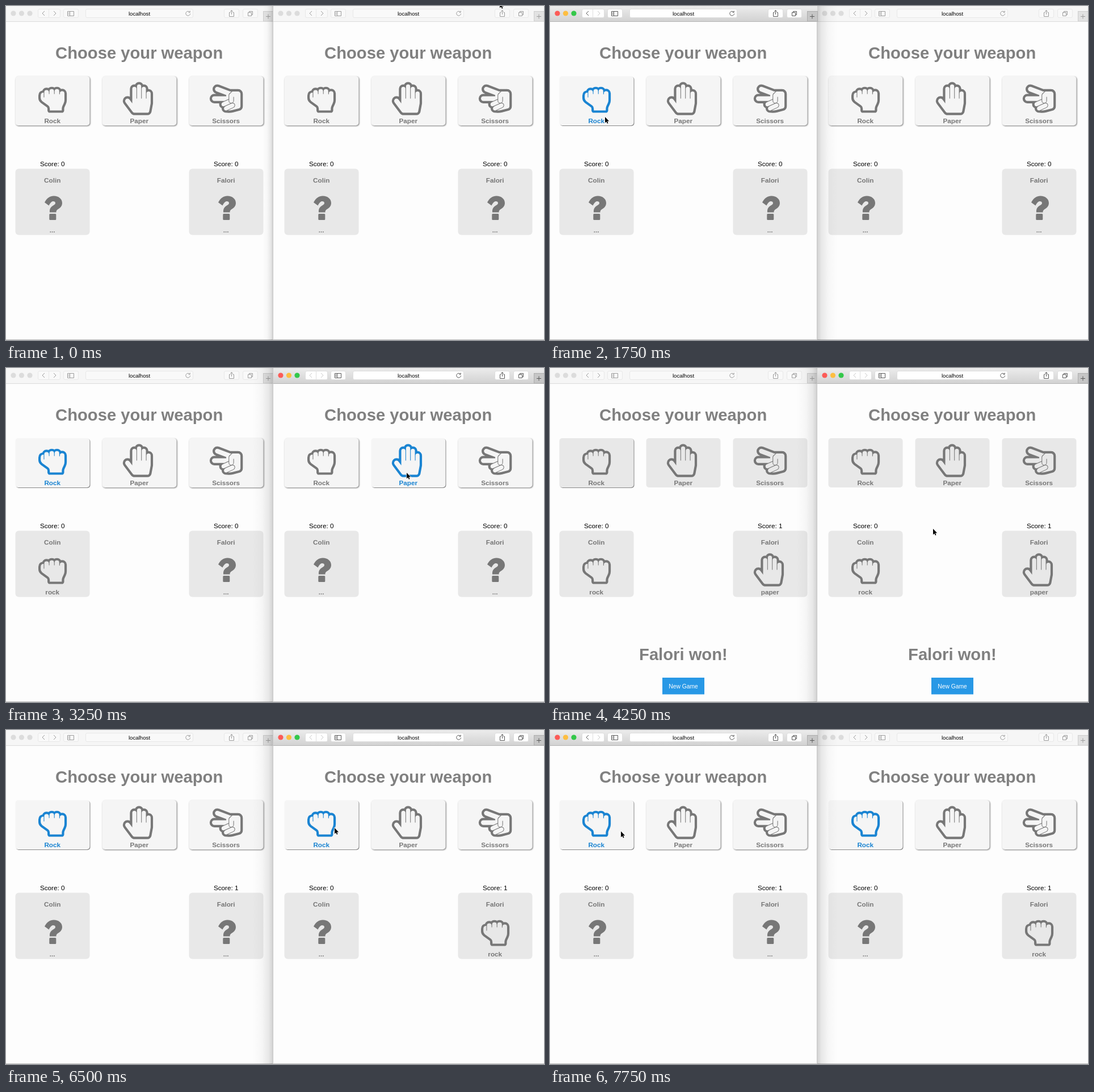
Write an HTML page that moves like this. It is 948x590 px and loops after 8 s.

```html
<!DOCTYPE html>
<html lang="en">
<head>
<meta charset="utf-8">
<title>Choose your weapon</title>
<style>
  html, body { margin: 0; width: 100%; height: 100%; overflow: hidden; background: #fdfdfd; }
  svg { display: block; }
  text { font-family: "Liberation Sans", Arial, sans-serif; text-anchor: middle; font-size: 11.7px; }
  .h { font-size: 29.2px; font-weight: bold; fill: #808080; }
  .b { font-weight: bold; fill: #777; }
  .icon { color: #777; --face: #e8e8e8; }
  .card .icon { --face: #f5f5f5; }
  .card rect { fill: #f5f5f5; filter: drop-shadow(1.7px 1.7px .8px #777); }
  .card.hover rect { filter: drop-shadow(1px 1px .5px #888); }
  .card.hover .icon { color: #1a84d2; }
  .card.hover text { fill: #1a84d2; }
  .over .card rect { fill: #e8e8e8; filter: none; }
  .over .card.hover rect { filter: drop-shadow(1px 1px .5px #888); }
  .over .card .icon { color: #777; --face: #e8e8e8; }
  .over .card text { fill: #777; }
  .bar { fill: #f6f6f6; }
  .rim { stroke: #dcdcdc; }
  .btn { fill: #f9f9f9; stroke: #e8e8e8; }
  .ink { fill: none; stroke: #9c9c9c; }
  .tab { fill: #e2e2e2; stroke: #cdcdcd; }
  .light { fill: #dcdcdc; }
  .active .bar { fill: url(#chrome); }
  .active .rim { stroke: #b4b4b4; }
  .active .btn { fill: #fff; stroke: #dedede; }
  .active .ink { stroke: #585858; }
  .active .off { stroke: #cacaca; }
  .active .tab { fill: #c6c6c6; stroke: #adadad; }
  .active .l0 { fill: #fc5b57; }
  .active .l1 { fill: #fdbe41; }
  .active .l2 { fill: #34c84a; }
</style>
</head>
<body>
<svg id="stage" width="948" height="590" viewBox="0 0 948 590">
  <defs>
    <linearGradient id="chrome" x2="0" y2="1">
      <stop stop-color="#ececec"/><stop offset="1" stop-color="#d2d2d2"/>
    </linearGradient>
    <linearGradient id="shade">
      <stop stop-opacity="0"/><stop offset=".45" stop-opacity=".025"/>
      <stop offset=".8" stop-opacity=".085"/><stop offset="1" stop-opacity=".17"/>
    </linearGradient>
    <!-- Hands: the pale inside is filled over a wide outline. -->
    <g fill="var(--face)" stroke="currentColor" stroke-width="256" stroke-linejoin="round" paint-order="stroke">
      <path d=""/>
    </g>
    <g id="unknown" fill="currentColor" transform="translate(-16 -317)">
      <path d="M68 347C72 339 78 335.5 84 335.5C93 335.5 99 341 99 348C99 354 95 357 91.5 359C89 360.5 88.5 362 88.5 364.5H77C76.5 358 79 355 83 352.5C86 350.5 87 349.8 87 348C87 346 85.5 345 83 345C80.5 345 78.5 347 75.5 352.5Z"/>
      <rect x="76.3" y="367" width="12" height="11" rx="1.5"/>
    </g>
  </defs>
</svg>
<script>
const LOOP = 8000;
const PLAYERS = ['Colin', 'Falori'];
const WEAPONS = ['Rock', 'Paper', 'Scissors'];
const stage = document.getElementById('stage');

// Insides of the hands, in units of 1/1792 of the icon size.
const FIST = 'M128 736q0-160 160-160v256h32v-276a124 124 0 0 1 248 0v90h32v-138a124 124 0 0 1 248 0v138h32v-138a124 124 0 0 1 248 0v160h32v-50a124 124 0 0 1 248 0v350q0 90-40 180l-70 150q-32 70-32 150v88h-646v-86q0-120-80-180l-330-240q-82-60-82-170z';
const PALM = 'M880 128a112 112 0 0 0-112 112v656h-32v-528a112 112 0 0 0-224 0v784l-154-205q-38-51-102-51a128 128 0 0 0-128 128q0 43 26 77l384 512q38 51 102 51h688q34 0 61-22t34-56l76-405q5-32 5-59v-498a112 112 0 0 0-224 0v272h-32v-528a112 112 0 0 0-224 0v528h-32v-656a112 112 0 0 0-112-112z';
const RING = 'M1024 825l-155 71-163 74q-66 32-66 102a112 112 0 0 0 112 112q26 0 46-10l338-154q-112-28-112-140z';
const PINKY = 'M1344 1136a112 112 0 0 0-112-112q-26 0-46 10l-290 132q-121 55-121 127a113 114 0 0 0 113 114q20 0 38-9l352-160q66-32 66-102z';
const BLADES = 'M1112 384l-650-248q-24-8-46-8a128 128 0 0 0-128 128q0 84 82 120l526 200v64h-640a128 128 0 0 0 0 256h535l233-106v-198q0-63 46-106l111-102z';
const THUMB = 'M1073 1408q82 0 155-19l339-85q97-28 97-124v-668a128 128 0 0 0-128-128h-308l-136 126q-36 33-36 82v296a112 108 0 0 0 112 108a112 116 0 0 0 112-116v-208h32v208q0 70-57 114q121 20 121 142q0 88-84 131l-310 141z';

// Each list holds [start in ms, value...]; a value stays until the next start.
const cursorSteps = [
  [0, 870, -7], [500, 538, 82], [750, 280, 227], [1000, 279, 231], [1250, 173, 239],
  [1500, 98, 208], [1750, 97, 196], [3000, 600, 190], [3250, 706, 185], [4250, 675, 284],
  [4500, 642, 519], [4750, 708, 552], [5000, 690, 558], [6000, 698, 212],
  [6250, 580, 169], [6500, 579, 173], [7250, 457, 173], [7500, 134, 180], [7750, 125, 179]
];
const frontSteps = [[0, 1], [1000, 0], [2500, 1], [7000, 0]];
const activeSteps = [[0, -1], [1000, 0], [2750, 1], [7000, 0]];
const hoverSteps = [
  [[0, -1], [1500, 0]],
  [[0, -1], [3000, 0], [3250, 1], [4250, -1], [6250, 0]]
];
const pickSteps = [
  [[0, '', ''], [2250, 'rock', ''], [3500, 'rock', 'paper'], [5250, '', '']],
  [[0, '', ''], [3500, 'rock', 'paper'], [5250, '', ''], [6500, '', 'rock']]
];

function at(steps, t) {
  let cur = steps[0];
  for (const s of steps) if (s[0] <= t) cur = s;
  return cur.slice(1);
}

function el(parent, tag, attrs = {}, text) {
  const n = document.createElementNS('http://www.w3.org/2000/svg', tag);
  for (const k in attrs) n.setAttribute(k, attrs[k]);
  if (text !== undefined) n.textContent = text;
  parent.appendChild(n);
  return n;
}

const shift = (parent, x, y = 0) => el(parent, 'g', { transform: `translate(${x} ${y})` });
const box = (p, cls, x, y, width, height, rx = 0) => el(p, 'rect', { class: cls, x, y, width, height, rx });
const ink = (p, d, cls = '') => el(p, 'path', { class: 'ink ' + cls, d });
const label = (p, cls, x, y, text) => el(p, 'text', { class: cls, x, y }, text);

function hand(id, x, y, d) {
  el(stage.querySelector('defs'), 'path', {
    id, d, transform: `translate(${x} ${y}) scale(${58.5 / 1792})`,
    fill: 'var(--face)', stroke: 'currentColor', 'stroke-width': 256,
    'stroke-linejoin': 'round', 'paint-order': 'stroke'
  });
}
stage.querySelector('defs > g:not([id])').remove();
hand('rock', 41, 10.3, FIST);
hand('paper', 36.8, 10.3, PALM);
hand('scissors', 36.8, 14.5, RING + PINKY + BLADES + THUMB);

function toolbar(g, i) {
  const near = shift(g, i * 471), far = shift(g, i * 477);
  [13, 27.5, 42].forEach((cx, k) => el(near, 'circle', { class: 'light l' + k, cx, cy: 13, r: 4.6 }));
  box(near, 'btn', 56.5, 5.5, 39, 15, 2.5);
  ink(near, 'M68 9L64 13L68 17', i ? 'off' : '');
  ink(near, 'M84 9L88 13L84 17', 'off');
  el(near, 'path', { class: 'btn', d: 'M75.5 6V20' });
  box(near, 'btn', 101.5, 5.5, 26, 15, 2.5);
  ink(near, 'M108.5 9.5H119.5V17.5H108.5ZM112.5 9.5V17.5M109.5 12H111.5M109.5 14.5H111.5');
  box(near, 'btn', 140.5, 5.5, 189 + i * 6, 15, 2.5);
  el(g, 'text', { x: 235 + i * 474, y: 17, style: 'font-size:9.7px' }, 'localhost');
  ink(far, 'M323.6 10.6A3.9 3.9 0 1 0 324.6 13.5M324.2 8.5V11.2H321.4');
  box(far, 'btn', 384.5, 5.5, 26, 15, 2.5);
  ink(far, 'M395.5 11.5H393.5V18.5H401.5V11.5H399.5M397.5 15V8M395 10L397.5 7.5L400 10');
  box(far, 'btn', 417.5, 5.5, 26, 15, 2.5);
  ink(far, 'M428.5 11V9.5H434.5V15.5H433M426.5 11.5H432.5V17.5H426.5Z');
  box(far, 'tab', 453.5, 9.5, 18, 17.5);
  ink(far, 'M462 14.5V22.5M458 18.5H466');
}

function makeWindow(i) {
  const g = el(stage, 'g');
  const shade = el(g, 'rect', { y: 0, height: 590, fill: 'url(#shade)' });
  const x0 = i ? 470 : 0, w = i ? 478 : 471;
  el(g, 'rect', { x: x0, y: 0, width: w, height: 590, fill: '#fdfdfd' });
  box(g, 'bar', x0, 0, w, 27);
  toolbar(g, i);
  el(g, 'path', { class: 'rim', d: `M${x0} 27.5H${x0 + w}` });
  el(g, 'path', { stroke: '#b8b8b8', d: `M${x0} 589.5H${x0 + w}` });
  el(g, 'path', { stroke: '#c6c6c6', d: i ? 'M470.5 0V590' : 'M470.5 28V590' });

  const page = shift(g, i * 474);
  label(page, 'h', 234.7, 92.5, 'Choose your weapon');
  const cards = WEAPONS.map((name, k) => {
    const c = el(shift(page, 16 + k * 153, 124), 'g');
    box(c, '', .5, 0, 131, 87, 5);
    el(c, 'use', { href: '#' + name.toLowerCase(), class: 'icon' });
    label(c, 'b', 65.7, 83, name);
    return c;
  });
  const slots = PLAYERS.map((name, k) => {
    const c = shift(page, 16 + k * 306, 287);
    const score = label(c, '', 65.7, -4, '');
    el(c, 'rect', { x: .5, y: .5, width: 131, height: 117, rx: 6, fill: '#e8e8e8' });
    label(c, 'b', 65.7, 25, name);
    const icon = el(c, 'use', { y: 30, class: 'icon' });
    return { score, icon, pick: label(c, 'b', 65.7, 113, '') };
  });
  const result = el(page, 'g');
  label(result, 'h', 234.9, 516, PLAYERS[1] + ' won!');
  const button = el(result, 'rect', { x: 198, y: 547, width: 74, height: 29.5 });
  el(result, 'text', { x: 235, y: 565.5, fill: '#fff', style: 'font-size:10.3px' }, 'New Game');
  return { g, shade, page, cards, slots, result, button };
}

const windows = [makeWindow(0), makeWindow(1)];
const cursor = el(stage, 'path', {
  d: 'M0 0V10.6L2.4 8.2L3.9 11.8L5.5 11.1L4 7.6H7.2Z',
  fill: '#000', stroke: '#fff', 'stroke-width': 1.2, 'paint-order': 'stroke'
});
let front = -1;

function drawWindow(win, i, t, active) {
  const over = t >= 3500 && t < 5250;
  const [hover] = at(hoverSteps[i], t);
  const picks = at(pickSteps[i], t);
  win.g.setAttribute('class', active === i ? 'active' : '');
  win.page.setAttribute('class', over ? 'over' : '');
  win.cards.forEach((c, k) => c.setAttribute('class', k === hover ? 'card hover' : 'card'));
  win.slots.forEach((s, k) => {
    s.score.textContent = 'Score: ' + (k === 1 && t >= 3500 ? 1 : 0);
    s.icon.setAttribute('href', '#' + (picks[k] || 'unknown'));
    s.pick.textContent = picks[k] || '...';
  });
  win.result.style.display = over ? '' : 'none';
  win.button.setAttribute('fill', i === 1 && t >= 5000 ? '#2083c9' : '#2898e6');
}

function draw(t) {
  const [top] = at(frontSteps, t), [active] = at(activeSteps, t);
  if (top !== front) {
    front = top;
    stage.append(windows[1 - top].g, windows[top].g, cursor);
  }
  const reach = t < 1000 ? 18 : 36;
  windows[1].shade.setAttribute('x', 470 - reach);
  windows.forEach((w, i) => {
    w.shade.setAttribute('width', reach);
    drawWindow(w, i, t, active);
  });
  const [x, y] = at(cursorSteps, t);
  cursor.setAttribute('transform', `translate(${x} ${y})`);
}

windows[0].shade.setAttribute('transform', 'translate(507 0) scale(-1 1)');

function tick() {
  draw(performance.now() % LOOP);
  requestAnimationFrame(tick);
}
tick();
</script>
</body>
</html>
```
